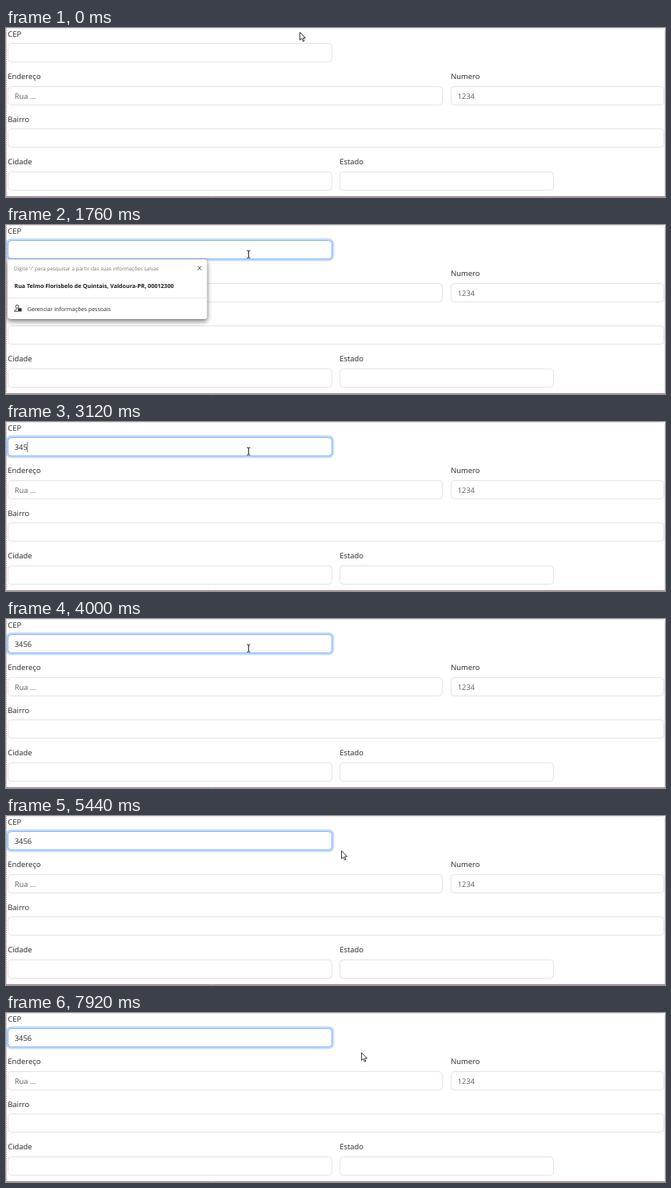
Write an HTML page that moves like this. It is 824x212 px and loops after 8000 ms.

```html
<!DOCTYPE html>
<html lang="pt-BR">
<head>
<meta charset="utf-8">
<title>CEP</title>
<style>
html, body { margin: 0; width: 100%; height: 100%; overflow: hidden; background: #fff; }
svg { display: block; width: 824px; height: 212px; font: 9.4px "Open Sans", "Noto Sans", sans-serif; fill: #212529; text-rendering: geometricPrecision; }
.field { fill: #fff; stroke: #e1e4e8; }
.hint { fill: #5b5f63; }
#menu { transform-origin: 127px 80.5px; font-size: 7px; }
#menu .box { fill: #fff; filter: drop-shadow(0 3px 3px #0006) drop-shadow(0 0 1px #0005); }
</style>
</head>
<body>
<svg viewBox="0 0 824 212">
  <path d="M2 .5H819Q823.5 .5 823.5 5V211" fill="none" stroke="#e6e6e8"/>
  <path d="M.5 0V211" stroke="#c98089" stroke-dasharray="1.3 1.3"/>
  <path d="M0 211.5H824" stroke="#a9808c"/>
  <g id="form"></g>
  <rect id="ring" x="1" y="18" width="408" height="26" rx="5.5" fill="none" stroke="#0d6efd" stroke-opacity=".25" stroke-width="2.7"/>
  <rect id="edge" x="2.5" y="19.5" width="405" height="23" rx="4" fill="none" stroke="#86b7fe"/>
  <text id="value" x="10.7" y="34.9"></text>
  <path id="caret" d="M0 25V38" stroke="#555" stroke-width=".8"/>
  <g id="menu">
    <rect class="box" x="2" y="43" width="249.5" height="75" rx="3"/>
    <text x="10" y="56.6" font-size="6.45" fill="#757575">Digite '/' para pesquisar a partir das suas informações salvas</text>
    <path d="M239.5 51.7l5 5m0-5l-5 5" stroke="#444" stroke-width=".9"/>
    <text x="10.5" y="79" font-size="7.1" font-weight="700" fill="#1b1b1b">Rua Telmo Florisbelo de Quintais, Valdoura-PR, 00012300</text>
    <path d="M2 91.5H251.5" stroke="#e4e4e4"/>
    <circle cx="14" cy="102.3" r="2" fill="none" stroke="#333" stroke-width=".9"/>
    <path d="M15 108.3H10.6Q10.3 105.6 14 105.6" fill="none" stroke="#333" stroke-width=".9"/>
    <rect x="15" y="104.3" width="4.6" height="4.3" rx=".8" fill="#333"/>
    <text x="26.7" y="107.5">Gerenciar informações pessoais</text>
  </g>
  <path id="arrow" d="M.5 .4V10.2L2.8 8.2L4.4 11.8L6 11.1L4.4 7.6H7.5Z" fill="#fff" stroke="#222" stroke-width=".9"/>
  <path id="beam" d="M-2-4.5H-.6L0-4L.6-4.5H2M0-4V4M-2 4.5H-.6L0 4L.6 4.5H2" fill="none" stroke="#111" stroke-width="1"/>
</svg>
<script>
const LOOP = 8000;
const $ = id => document.getElementById(id);
const ramp = (t, from, to) => Math.min(1, Math.max(0, (t - from) / (to - from)));
const ease = p => p * p * (3 - 2 * p);

// label, x, y of the label's baseline, width, placeholder
const fields = [
  ['CEP', 2.5, 11, 405, ''],
  ['Endereço', 2.5, 64.4, 543, 'Rua ...'],
  ['Numero', 556.5, 64.4, 266, '1234'],
  ['Bairro', 2.5, 117.9, 820, ''],
  ['Cidade', 2.5, 171.3, 405, ''],
  ['Estado', 417.5, 171.3, 267, '']
];
$('form').innerHTML = fields.map(([label, x, y, w, hint]) => {
  const top = Math.ceil(y) + 8.5;
  return `<text x="${x - .2}" y="${y}">${label}</text>
    <rect class="field" x="${x}" y="${top}" width="${w}" height="23" rx="4"/>
    <text class="hint" x="${x + 8.2}" y="${top + 15}">${hint}</text>`;
}).join('');

// start, end, x, y reached
const moves = [[80, 880, 303.3, 36.7], [4600, 5240, 419, 43.3], [6320, 6960, 444, 49.3]];
const keys = [2730, 2930, 3120, 3300];
const FOCUS = 1120, BLINK = 600;

function pointer(t) {
  let x = 367, y = 5;
  for (const [from, to, tx, ty] of moves) {
    const p = ease(ramp(t, from, to));
    x += (tx - x) * p;
    y += (ty - y) * p;
  }
  const text = y > 19 && y < 43 && x < 408;
  $('arrow').style.display = text ? 'none' : '';
  $('beam').style.display = text ? '' : 'none';
  $(text ? 'beam' : 'arrow').setAttribute('transform', `translate(${x} ${y})`);
}

function draw(t) {
  pointer(t);
  const focus = ease(ramp(t, 1200, 1350));
  $('ring').style.opacity = $('edge').style.opacity = focus;

  const typed = keys.filter(k => t >= k);
  const value = $('value');
  value.textContent = '3456'.slice(0, typed.length);
  const since = t - (typed.length ? typed[typed.length - 1] : FOCUS);
  const width = typed.length ? value.getComputedTextLength() : 0;
  $('caret').setAttribute('transform', `translate(${10.7 + width} 0)`);
  $('caret').style.display = since >= 0 && since % (2 * BLINK) < BLINK ? '' : 'none';

  const shown = ramp(t, 1450, 1600), gone = ramp(t, 2740, 2920);
  $('menu').style.opacity = shown * (1 - gone);
  $('menu').style.transform = `scale(${1 - .07 * (1 - shown + gone)})`;
}

function tick(now) {
  draw(now % LOOP);
  requestAnimationFrame(tick);
}
draw(0);
requestAnimationFrame(tick);
</script>
</body>
</html>
```
